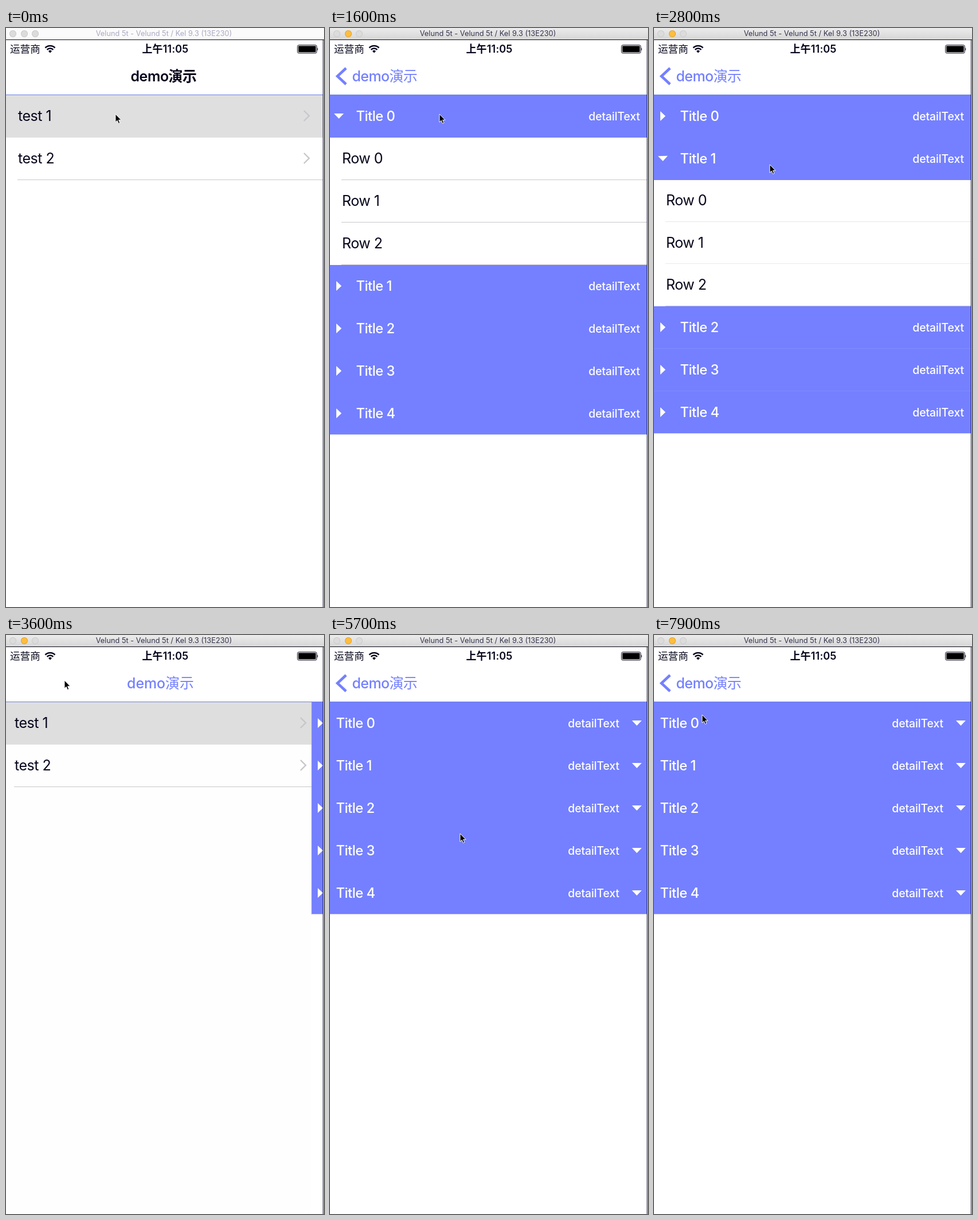
These frames come from a looping animation (555x1009 px, 8 s). An HTML page:

```html
<!DOCTYPE html>
<html lang="zh">
<head>
<meta charset="utf-8">
<title>demo演示</title>
<style>
  html, body { margin: 0; width: 100%; height: 100%; overflow: hidden; background: #fff; }
  #stage { position: relative; width: 555px; height: 1009px; overflow: hidden; background: #fff;
    font: 25px Inter, "Noto Sans CJK SC", "Noto Sans CJK", sans-serif; color: #06061c; }
  #stage div, #stage svg, #stage span { position: absolute; white-space: pre; }
  #bar { left: 0; top: 0; width: 555px; height: 21px; border-bottom: 1px solid #0a0a18; box-sizing: border-box;
    line-height: 20px; background: #fbfbfb; }
  #bar.on { background: linear-gradient(#ececec, #d6d6d6); }
  #bar span { left: 0; top: 0; width: 551px; text-align: center; font-size: 12.8px; color: #a9a9c4; }
  #bar.on span { color: #34344e; }
  .dot { top: 4px; width: 12px; height: 12px; border-radius: 50%; background: #dcdcdc; box-shadow: inset 0 0 0 1px #cbcbcb; }
  #bar.on .yellow { background: #fdbe40; box-shadow: inset 0 0 0 1px #e2a536; }
  .status { top: 26px; line-height: 22px; font-size: 17.6px; }
  .clock { left: 178px; width: 200px; text-align: center; font-weight: 600; font-size: 18px; letter-spacing: .01em; }
  #nav { left: 0; top: 64px; line-height: 40px; }
  #hair { top: 116px; left: 0; width: 553px; height: 1px; background: #6f83e0; }
  #edge { top: 21px; left: 553px; width: 1px; height: 988px; background: #05052a; }
  #view { top: 117px; left: 0; width: 553px; height: 892px; overflow: hidden; }
  .page { left: 0; top: 0; width: 553px; height: 892px; background: #fff; overflow: hidden; }
  .cell { left: 0; width: 553px; height: 74px; line-height: 73px; background: #fff; }
  .cell span { left: 21px; top: 0; letter-spacing: -.02em; }
  .line { left: 20px; right: 0; bottom: 0; height: 1px; background: #c8c7cc; }
  .head { left: 0; top: 0; width: 553px; height: 74px; line-height: 74px; background: #7480ff; color: #fff; font-weight: 500; }
  .head:last-child { box-shadow: inset 0 -1px #c9cdff; }
  .head span { top: 0; }
  .name { font-size: 23.8px; letter-spacing: -.02em; }
  .detail { font-size: 19.4px; letter-spacing: -.005em; }
  #dim { left: 0; top: 0; width: 553px; height: 892px; background: #000; }
</style>
</head>
<body>
<div id="stage">
  <div id="view"></div>
  <div id="hair"></div>
  <span class="status" style="left:7px">运营商</span>
  <svg style="left:67px;top:28px" width="20" height="17" viewBox="0 0 20 17" fill="none" stroke="#06061c" stroke-width="2.6">
    <path d="M1.5 6.5a12 12 0 0 1 17 0M4.6 9.8a7.6 7.6 0 0 1 10.8 0"/>
    <path d="M10 15.5l-3-3.2a4.3 4.3 0 0 1 6 0z" fill="#06061c" stroke="none"/>
  </svg>
  <span class="status clock">上午11:05</span>
  <svg style="left:508px;top:29px" width="38" height="16" viewBox="0 0 38 16">
    <rect x=".7" y=".7" width="33.6" height="14.2" rx="2.5" fill="none" stroke="#06061c"/>
    <rect x="2.3" y="2.3" width="30.4" height="11" rx="1"/>
    <path d="M35.4 5.2q2 2.6 0 5.2z"/>
  </svg>
  <svg id="back" style="left:8px;top:66px" width="24" height="36" viewBox="0 0 24 36">
    <path d="M20 4L5 18L20 32" fill="none" stroke="#7480ff" stroke-width="4.6"/>
  </svg>
  <span id="nav">demo演示</span>
  <div id="edge"></div>
  <div id="bar">
    <div class="dot" style="left:6px"></div>
    <div class="dot yellow" style="left:25.5px"></div>
    <div class="dot" style="left:45px"></div>
    <span>Velund 5t - Velund 5t / Kel 9.3 (13E230)</span>
  </div>
  <svg id="cursor" style="left:0;top:0" width="14" height="20" viewBox="-1 -1 14 20">
    <path d="M0 0V14.2L3.2 11.2L5.4 16.4L7.8 15.4L5.6 10.3H10z" fill="#000" stroke="#fff" stroke-width="1"/>
  </svg>
</div>
<script>
const LOOP = 8000, STEP = 100, ROW = 74, FOLD = 300, SLIDE = 500, WIDTH = 553;

// page, section, opening time, closing time
const folds = [
  [0, 0, 1150, 1750], [0, 1, 2540, 2900],
  [1, 0, 4640, 5200], [1, 3, 5750, 6350], [1, 1, 6900, 7350]
];
// time, x, y of the pointer tip
const path = [
  [0, 190, 149], [1700, 190, 149], [2300, 201, 237], [3000, 201, 237],
  [3300, 101, 78], [3650, 101, 78], [3950, 205, 226], [4300, 205, 226],
  [4600, 209, 154], [5300, 209, 154], [5700, 226, 345], [6400, 226, 345],
  [6900, 214, 228], [7450, 214, 228], [7900, 83, 138], [8000, 83, 138]
];
const PUSH1 = 60, POP = 3265, PUSH2 = 4000, PICK2 = 3900;

const $ = id => document.getElementById(id);
const clamp = x => Math.min(1, Math.max(0, x));
const easeOut = x => 1 - (1 - clamp(x)) ** 3;
const easeBoth = x => (x = clamp(x)) < .5 ? 4 * x ** 3 : 1 - 4 * (1 - x) ** 3;
const mix = (a, b, p) => a + (b - a) * p;

function add(parent, cls, html = '') {
  const el = document.createElement('div');
  el.className = cls;
  el.innerHTML = html;
  parent.append(el);
  return el;
}
function cell(parent, text, more = '') {
  return add(parent, 'cell', `<div class="line"></div><span>${text}</span>${more}`);
}

const view = $('view');
const list = add(view, 'page');
const mark = `<svg style="left:517px;top:24px" width="16" height="24"><path d="M3 3L12 12L3 21"
  fill="none" stroke="#c7c7cc" stroke-width="2.4"/></svg>`;
const items = [1, 2].map((n, i) => {
  const el = cell(list, 'test ' + n, mark);
  el.style.top = i * ROW + 'px';
  return el;
});
const dim = add(list, '');
dim.id = 'dim';

function makePage(right) {
  const el = add(view, 'page');
  const rows = [0, 1, 2].map(n => cell(el, 'Row ' + n));
  const shape = right ? 'M0 4L17 4L8.5 13Z' : 'M4 0L4 17L13 8.5Z';
  const heads = [0, 1, 2, 3, 4].map(n => add(el, 'head',
    `<svg style="left:${right ? 527 : 7}px;top:28px" width="17" height="17"><path d="${shape}" fill="#fff"/></svg>` +
    `<span class="name" style="left:${right ? 10.5 : 45.5}px">Title ${n}</span>` +
    `<span class="detail" style="right:${right ? 48 : 12}px">detailText</span>`));
  return { el, rows, heads, turn: right ? 180 : 90 };
}
const pages = [makePage(false), makePage(true)];

function drawFold(page, index, t) {
  const open = folds.find(f => f[0] === index && t >= f[2] && t < f[3] + FOLD);
  const p = open ? easeBoth((t - open[2]) / FOLD) * (1 - easeBoth((t - open[3]) / FOLD)) : 0;
  const at = open ? open[1] : -1;
  page.heads.forEach((head, i) => {
    const y = i * ROW + (open && i > at ? 3 * ROW * p : 0);
    head.style.transform = `translateY(${y}px)`;
    head.firstChild.style.transform = `rotate(${i === at ? page.turn * p : 0}deg)`;
  });
  page.rows.forEach((row, i) => {
    row.style.display = open ? 'block' : 'none';
    row.style.opacity = p;
    row.style.transform = `translateY(${at * ROW + (i + 1) * ROW * p}px)`;
  });
}

function drawCursor(t) {
  const i = path.findIndex(k => k[0] > t);
  const [t0, x0, y0] = path[i - 1], [t1, x1, y1] = path[i];
  const p = (t - t0) / (t1 - t0), s = p * p * (3 - 2 * p);
  $('cursor').style.transform = `translate(${mix(x0, x1, s)}px,${mix(y0, y1, s)}px)`;
}

function draw(t) {
  const slide = start => easeOut((t - start) / SLIDE);
  const pushed = t < POP ? slide(PUSH1) : t < PUSH2 ? 1 - slide(POP) : slide(PUSH2);
  const shown = t < PUSH2 ? 0 : 1;

  $('bar').className = t >= STEP ? 'on' : '';
  list.style.transform = `translateX(${-.3 * WIDTH * pushed}px)`;
  dim.style.opacity = .1 * pushed;
  const picked = t < PICK2 ? 0 : 1;
  items.forEach((el, i) => {
    el.style.background = i === picked ? '#dfdfdf' : '#fff';
    el.firstChild.style.visibility = i === picked || i + 1 === picked ? 'hidden' : 'visible';
  });
  // the lower divider stays while the first row is picked
  pages.forEach((page, i) => {
    page.el.style.display = i === shown && pushed > 0 ? 'block' : 'none';
    page.el.style.transform = `translateX(${WIDTH * (1 - pushed)}px)`;
    drawFold(page, i, t);
  });

  const nav = $('nav').style;
  nav.transform = `translateX(${mix(217.5, 38.5, pushed)}px)`;
  nav.color = pushed > 0 ? '#7480ff' : '#06061c';
  nav.fontWeight = pushed > 0 ? 500 : 600;
  nav.letterSpacing = pushed > .5 ? '-.025em' : pushed > 0 ? '-.005em' : '-.02em';
  $('back').style.opacity = clamp(pushed * 1.2 - .2);
  drawCursor(t);
}

const begin = performance.now();
function tick() {
  const t = (performance.now() - begin) % LOOP;
  draw(Math.floor(t / STEP) * STEP);
  requestAnimationFrame(tick);
}
draw(0);
tick();
</script>
</body>
</html>
```
